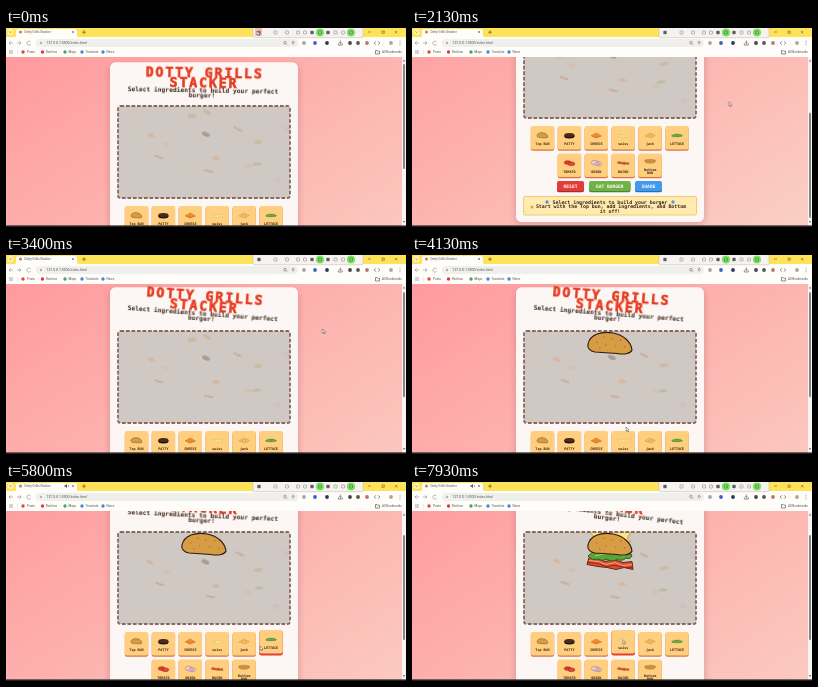
Animation, 400 px wide and 199 px high, one loop 8 s. Source, as an HTML page:

```html
<!DOCTYPE html>
<html lang="en">
<head>
<meta charset="utf-8">
<title>Dotty Grills Stacker</title>
<style>
  html, body { margin: 0; width: 100%; height: 100%; overflow: hidden; }
  svg { display: block; width: 100vw; height: 100vh; }
  text { font-family: "DejaVu Sans Mono", monospace; fill: #3c251b; text-anchor: middle; }
  .ui { font-family: Roboto, Arial, sans-serif; font-size: 3.1px; fill: #555; text-anchor: start; }
  .title { font-size: 13.2px; font-weight: bold; letter-spacing: 1.9px; fill: #e5392f; stroke: #e5392f; stroke-width: .5; filter: drop-shadow(.9px .9px 0 #ffc64a); }
  .sub { font-size: 6.25px; font-weight: bold; }
  .info { font-size: 4.9px; font-weight: bold; }
  .label { font-size: 3.4px; font-weight: bold; }
  .button { font-size: 4.6px; font-weight: bold; fill: #fff; }
</style>
</head>
<body>
<svg viewBox="0 0 400 199" preserveAspectRatio="none">
  <defs>
    <linearGradient id="pink" x2="1" y2="1">
      <stop stop-color="#ff9a9e"/><stop offset="1" stop-color="#fad0c4"/>
    </linearGradient>
    <filter id="soft" x="-10%" width="120%"><feGaussianBlur stdDeviation="3"/></filter>
    <clipPath id="view"><rect y="29" width="396" height="169"/></clipPath>
    <clipPath id="tray"><rect x="113" y="78" width="171" height="92"/></clipPath>

    <g id="bun" stroke="#2a1a10" stroke-width="1.1">
      <path fill="#d79c44" d="M-22 0C-20-10-8-13 3-11C14-9 21-2 22 6C21 9 15 11 7 9.5L-15 8C-20 7-23 4-22 0Z"/>
      <path d="M-14-2h1.5M-7-7h1.5M-5 1h1.5M1-5h1.5M5 2h1.5M10-4h1.5M14 3h1.5M-11 4h1.5" stroke="#a86c24"/>
    </g>
    <g id="patty">
      <ellipse cy="2" rx="21" ry="10" fill="#1d120d"/><ellipse cy="-2" rx="20" ry="8" fill="#4a2c1f"/>
    </g>
    <g id="cheese" stroke="#a85b19">
      <path fill="#f08b2c" d="M-21 1L0-11L21 2L-2 11Z"/><path d="M-21 1L0 7L21 2" fill="none"/>
    </g>
    <g id="swiss" stroke="#c9a545">
      <path fill="#f9e58c" d="M-21-4L21-4L17 2L21 5L3 9L-20 4L-16 0Z"/>
      <path fill="#fff6cc" d="M-11-2h6v3h-6zM3 1h6v3h-6z"/>
    </g>
    <g id="jack" stroke="#9c6a26">
      <path fill="#f1bd62" d="M-21 2L-2-10L21 0L4 10Z"/><path d="M-8 0h3M3 3h3M5-4h3" stroke="#d9542f" stroke-width="2"/>
    </g>
    <g id="lettuce" stroke="#2c5c25">
      <path fill="#5aa43a" d="M-22 1Q-14-7 0-6Q15-7 22 0Q21 5 16 3Q12 7 7 4Q2 8-3 4Q-8 7-12 4Q-18 6-22 1Z"/>
      <path fill="none" stroke="#b3cf70" d="M-15 1Q0-4 15 1"/>
    </g>
    <g id="tomato" fill="#d83a2e" stroke="#7f221b">
      <ellipse cx="-7" cy="-2" rx="14" ry="8"/><ellipse cx="8" cy="3" rx="14" ry="8"/>
      <path d="M1 2h4M8 6h4M11 0h4" stroke="#f5b092" stroke-width="2"/>
    </g>
    <g id="onion" fill="#f0dce3" stroke="#96506f" stroke-width="2">
      <ellipse cx="-6" cy="-2" rx="14" ry="8"/><ellipse cx="7" cy="3" rx="14" ry="8"/><ellipse cx="7" cy="3" rx="7" ry="3"/>
    </g>
    <g id="bacon" stroke="#6f2218">
      <path fill="#d9502f" d="M-21-6L-12-5L-5-2L4-4L13-1L22-2L23 6L14 4L6 6L-3 4L-12 3L-23 1Z"/>
      <path fill="none" stroke="#f3a673" d="M-21-3L-12-2L-4 1L5-1L13 2L22 1"/>
      <path fill="none" stroke="#8f2a1c" d="M-22-1L-12 0L-4 3L5 2L14 4L22 4"/>
    </g>
    <g id="base" stroke="#6c431b">
      <path fill="#d79b45" d="M-21-4Q0-11 21-4V3Q16 10 0 9Q-17 10-21 3Z"/><path fill="none" d="M-20-2Q0 4 20-2"/>
    </g>
  </defs>

  <g clip-path="url(#view)">
    <g id="page">
      <rect y="29" width="396" height="254" fill="url(#pink)"/>
      <rect x="103" y="37" width="190" height="239" rx="6" fill="#b9686c" opacity=".4" filter="url(#soft)"/>
      <rect x="104" y="34.3" width="188" height="239.7" rx="5.5" fill="#fcf7f4"/>
      <rect x="112" y="78" width="172" height="92" rx="2.5" fill="#d0c8c3"/>
      <g id="floaters" opacity=".27"/>
      <g id="stack" clip-path="url(#tray)"/>
      <rect x="112" y="78" width="172" height="92" rx="2.5" fill="none" stroke="#87695f" stroke-width="1.8" stroke-dasharray="3.7 1.8"/>
      <g id="heading">
        <text class="title" x="198.5" y="50">DOTTY GRILLS</text>
        <text class="title" x="198" y="60">STACKER</text>
        <text class="sub" x="197" y="65.3">Select ingredients to build your perfect</text>
        <text class="sub" x="196" y="69.7">burger!</text>
      </g>
      <g id="cards"/>
      <g id="buttons"/>
      <rect x="111.5" y="248.5" width="173" height="18.5" rx="1.5" fill="#ffeab0" stroke="#f4cb67"/>
      <text class="info" x="198" y="255.5">Select ingredients to build your burger</text>
      <text class="info" x="199" y="260.2">Start with the Top bun, add ingredients, and Bottom</text>
      <text class="info" x="198" y="264.8">it off!</text>
      <g fill="#4f9bd6"><circle cx="135" cy="254" r="1.7"/><circle cx="261" cy="254" r="1.7"/></g>
      <circle cx="120" cy="259" r="1.5" fill="#e0a52e"/>
    </g>
  </g>
  <rect x="396" y="29" width="4" height="169" fill="#f6f4f4"/>
  <rect id="thumb" x="397" y="36" width="2" height="105" rx="1" fill="#858585"/>
  <path d="M396.8 33.5l1.2-2l1.2 2zM396.8 193l1.2 2l1.2-2z" fill="#777"/>
  <rect y="197.4" width="400" height="1.6" fill="#242224"/>

  <g id="browser">
    <rect width="400" height="10" fill="#fee257"/>
    <rect y="9" width="400" height="20" fill="#fffdf9"/>
    <path d="M7 10Q10 10 10 7V3Q10 1 12 1H69Q71 1 71 3V7Q71 10 74 10Z" fill="#fffdf9"/>
    <circle cx="4.5" cy="4" r="3" fill="#fff3b5"/><path d="M3.4 3.5l1.1 1.1l1.1-1.1M76 4.2h4M78 2.2v4" fill="none" stroke="#554a20" stroke-width=".6"/>
    <circle cx="14.5" cy="4" r="1.6" fill="#d2873b"/>
    <text class="ui" x="18.5" y="5.2">Dotty Grills Stacker</text>
    <path id="sound" d="M58.5 3.2h1l1.5-1.2v4l-1.5-1.2h-1zM62 2.5q1.5 1.5 0 3" fill="#555"/>
    <path d="M66 3l2 2m0-2l-2 2M362 4h3M389 3l2.4 2.4m0-2.4l-2.4 2.4M376 3h2.3v2.3H376z" fill="none" stroke="#444" stroke-width=".5"/>
    <path d="M7 15H3l1.7-1.7M3 15l1.7 1.7M11 15h4l-1.7-1.7M15 15l-1.7 1.7M24.5 14a2 2 0 1 0 .2 2" fill="none" stroke="#777" stroke-width=".5"/>
    <rect x="30" y="11" width="262" height="8" rx="4" fill="#efefeb"/>
    <circle cx="35" cy="15" r="2.5" fill="#fffdf9"/><circle cx="35" cy="15" r="1" fill="none" stroke="#555" stroke-width=".5"/>
    <text class="ui" x="40.5" y="16.2" style="font-size:3.45px">127.0.0.1:5500/index.html</text>
    <circle cx="279" cy="14.7" r="1.3" fill="none" stroke="#555" stroke-width=".5"/>
    <path d="M280 15.7l1 1M286 15l1.2-2l1.2 2l-1.2 1.2z" fill="none" stroke="#555" stroke-width=".5"/>
    <g id="icons"/>
    <path d="M3.5 22.5h1v1h-1zM5.5 22.5h1v1h-1zM3.5 24.5h1v1h-1zM5.5 24.5h1v1h-1z" fill="#555"/>
    <path d="M11.5 22v4.5" stroke="#ccc" stroke-width=".4"/>
    <path d="M332.3 15.5v1.5h4v-1.5M334.3 12.5v3m-1.2-1.2l1.2 1.2l1.2-1.2M369.8 13.3l-1.6 1.7l1.6 1.7M372.2 13.3l1.6 1.7l-1.6 1.7M369.5 22.5h1.5l.6.7h1.9v2.8h-4zM394 12.8v.8m0 1v.8m0 1v.8" fill="none" stroke="#444" stroke-width=".6"/>
    <text class="ui" x="376" y="25.2">All Bookmarks</text>
    <g id="recorder">
      <rect x="247" y="-1" width="110" height="10.7" rx="1" fill="#f5f2f0" stroke="#c9c2b4" stroke-width=".6"/>
    </g>
  </g>
  <g id="cursor"><path d="M0 0V4.2L1 3.3L1.7 4.8L2.4 4.5L1.8 3H3.1Z" fill="#fff" stroke="#333" stroke-width=".45"/></g>
</svg>
<script>
const LOOP = 8000;
const byId = id => document.getElementById(id);

function add(parent, tag, attrs, text) {
  const el = document.createElementNS('http://www.w3.org/2000/svg', tag);
  for (const key in attrs) el.setAttribute(key, attrs[key]);
  if (text) el.textContent = text;
  return parent.appendChild(el);
}

// Each step is [ms, value]; the last value holds until the loop restarts.
function play(el, steps, style, easing = 'ease-in-out') {
  const frames = steps.map(([ms, ...v]) => ({ offset: ms / LOOP, easing, ...style(...v) }));
  const last = steps.at(-1);
  if (last[0] < LOOP) frames.push({ offset: 1, ...style(...last.slice(1)) });
  el.animate(frames, { duration: LOOP, iterations: Infinity });
}
const move = (x, y) => ({ transform: `translate(${x}px, ${y}px)` });
const rise = y => move(0, y);
const turn = deg => ({ transform: `rotate(${deg}deg)` });
const show = opacity => ({ opacity });

function food(parent, name, x, y, scale, spin = 0) {
  return add(parent, 'use', { href: '#' + name, transform: `translate(${x} ${y}) rotate(${spin}) scale(${scale})` });
}

// Browser furniture
[['Postu', 17, 21, '#dc4a3e'], ['Reelnox', 36.5, 40, '#e93530'], ['Maps', 59, 62.5, '#43a566'],
 ['Translate', 76, 79.5, '#4c86dc'], ['News', 97, 100.5, '#4d83ce']].forEach(([name, cx, x, fill]) => {
  add(byId('browser'), 'circle', { cx, cy: 24, r: 1.7, fill });
  add(byId('browser'), 'text', { class: 'ui', x, y: 25.2 }, name);
});
[[298, '#a9a2ad'], [309, '#3a5fd0'], [321, '#28395e'], [344, '#454545'], [352, '#555'], [361, '#b9786d'], [385, '#b5a294']]
  .forEach(([cx, fill]) => add(byId('icons'), 'circle', { cx, cy: 15, r: 1.9, fill }));

const recorder = byId('recorder');
[253, 269.5, 281, 292, 299, 306, 314, 322, 329.5, 337, 345].forEach((x, i) => {
  const green = i === 6 || i === 10;
  if (green) add(recorder, 'circle', { cx: x, cy: 4.5, r: 4.1, fill: '#7ddf63' });
  add(recorder, 'rect', {
    x: x - 1.5, y: 3, width: 3, height: 3, rx: .6,
    fill: i === 0 || i === 5 || i === 7 ? '#555' : 'none', stroke: green ? '#287a2a' : '#8a8585', 'stroke-width': .6
  });
});
const pressed = add(recorder, 'rect', { x: 249, y: 0, width: 7, height: 8, fill: '#e76c62', opacity: .4 });
play(pressed, [[0, .4], [350, 0]], show, 'steps(1)');

// Faint ingredients drifting behind the tray
const spots = [[186, 88, 'bun'], [201, 84, 'base'], [131, 98, 'swiss'], [145, 107, 'cheese'], [200, 106, 'patty'],
  [232, 101, 'bacon'], [281, 101, 'onion'], [160, 116, 'jack'], [153, 129, 'bacon'], [189, 137, 'swiss'],
  [203, 143, 'bacon'], [210, 130, 'cheese'], [243, 138, 'jack'], [251, 136, 'lettuce'], [270, 152, 'onion'], [252, 114, 'base']];
spots.forEach(([x, y, name], i) => {
  const drift = add(byId('floaters'), 'g', {});
  food(drift, name, x, y, .19, i * 47 % 50 - 15);
  const dx = Math.sin(i * 2.3) * 2, dy = Math.cos(i * 1.7) * 2;
  play(drift, [[0, 0, 0], [2000, dx, dy], [4000, 0, -dy], [6000, -dx, dy], [8000, 0, 0]], move);
});

// Ingredient cards, with the intervals during which the pointer lifts them
function card(name, label, x, y, hover) {
  const g = add(byId('cards'), 'g', {});
  add(g, 'rect', { x: x - 11.7, y: y + 1, width: 23.4, height: 23.8, rx: 2, fill: '#db7440' });
  const edge = hover && add(g, 'rect', { x: x - 11.7, y: y + 1, width: 23.4, height: 24.4, rx: 2, fill: '#e23f32' });
  add(g, 'rect', { x: x - 11.7, y, width: 23.4, height: 23.6, rx: 2, fill: '#ffce7e' });
  const lines = label.split('|');
  food(g, name, x, y + (lines[1] ? 7.5 : 9.5), .25);
  lines.forEach((line, i) => add(g, 'text', { class: 'label', x, y: y + 19 + (i - lines.length + 1) * 3.4 + (lines.length - 1) * 1.5 }, line));
  if (!hover) return;
  const [on, off] = hover;
  play(g, [[0, 0], [on, 0], [on + 130, -2], [off, -2], [Math.min(off + 130, LOOP), off < LOOP ? 0 : -2]], rise);
  play(edge, [[0, 0], [on, 1], [off, 0]], show, 'steps(1)');
}
const column = i => 130.5 + i * 26.9;
[['bun', 'Top BUN', [3650, 3950]], ['patty', 'PATTY'], ['cheese', 'CHEESE'], ['swiss', 'swiss', [7350, LOOP]],
 ['jack', 'jack'], ['lettuce', 'LETTUCE', [5450, 6150]]].forEach(([name, label, hover], i) => card(name, label, column(i), 178, hover));
[['tomato', 'TOMATO'], ['onion', 'ONION'], ['bacon', 'BACON', [6500, 7150]],
 ['base', 'Bottom|BUN']].forEach(([name, label, hover], i) => card(name, label, column(i + 1), 205.5, hover));

[['RESET', 145, 27, '#e33d3b', '#a92b2b'], ['EAT BURGER', 177, 41.5, '#70b247', '#4a8430'],
 ['SHARE', 223, 27, '#409aee', '#2a6fb5']].forEach(([label, x, width, fill, shade]) => {
  add(byId('buttons'), 'rect', { x, y: 234, width, height: 10.3, rx: 2, fill: shade });
  add(byId('buttons'), 'rect', { x, y: 233, width, height: 10, rx: 2, fill });
  add(byId('buttons'), 'text', { class: 'button', x: x + width / 2, y: 239.6 }, label);
});

// Pieces falling into the burger: name, resting height, start and landing time
[['swiss', 98, 7780, 8080], ['bacon', 109.5, 6850, 7150], ['lettuce', 101, 5900, 6200], ['bun', 91, 3850, 4100]]
  .forEach(([name, y, start, land]) => {
    const piece = add(byId('stack'), 'g', {});
    food(piece, name, 198, y, 1);
    const end = Math.min(land, LOOP), fall = 66 - y;
    play(piece, [[0, fall], [start, fall], [end, fall * (land - end) / (land - start)]], rise, 'linear');
    play(piece, [[0, 0], [start, 1]], show, 'steps(1)');
  });

// The heading swings about a point right of its centre
byId('heading').style.transformOrigin = '228px 58px';
play(byId('heading'), [[0, 1], [1130, 4.4], [2730, 4.2], [4130, 4.5], [5800, 2.6], [7930, 7.2]], turn);

const scroll = [[0, 0], [1450, 0], [1900, 80], [2350, 80], [2730, 9], [2950, 2], [4500, 2], [4950, 28]];
play(byId('page'), scroll, y => rise(-y));
play(byId('thumb'), scroll, y => rise(y * .61));
play(byId('sound'), [[0, 0], [4400, 1]], show, 'steps(1)');
play(byId('cursor'), [[0, 251, 3], [250, 251, 3], [800, 317, 73.5], [3500, 316.5, 74], [3750, 130, 186], [3900, 130, 186],
  [4130, 214, 172], [4900, 214, 172], [5500, 254, 164], [6200, 254, 164], [6600, 210, 186], [7050, 210, 186],
  [7500, 210.5, 157.5]], move);
</script>
</body>
</html>
```
